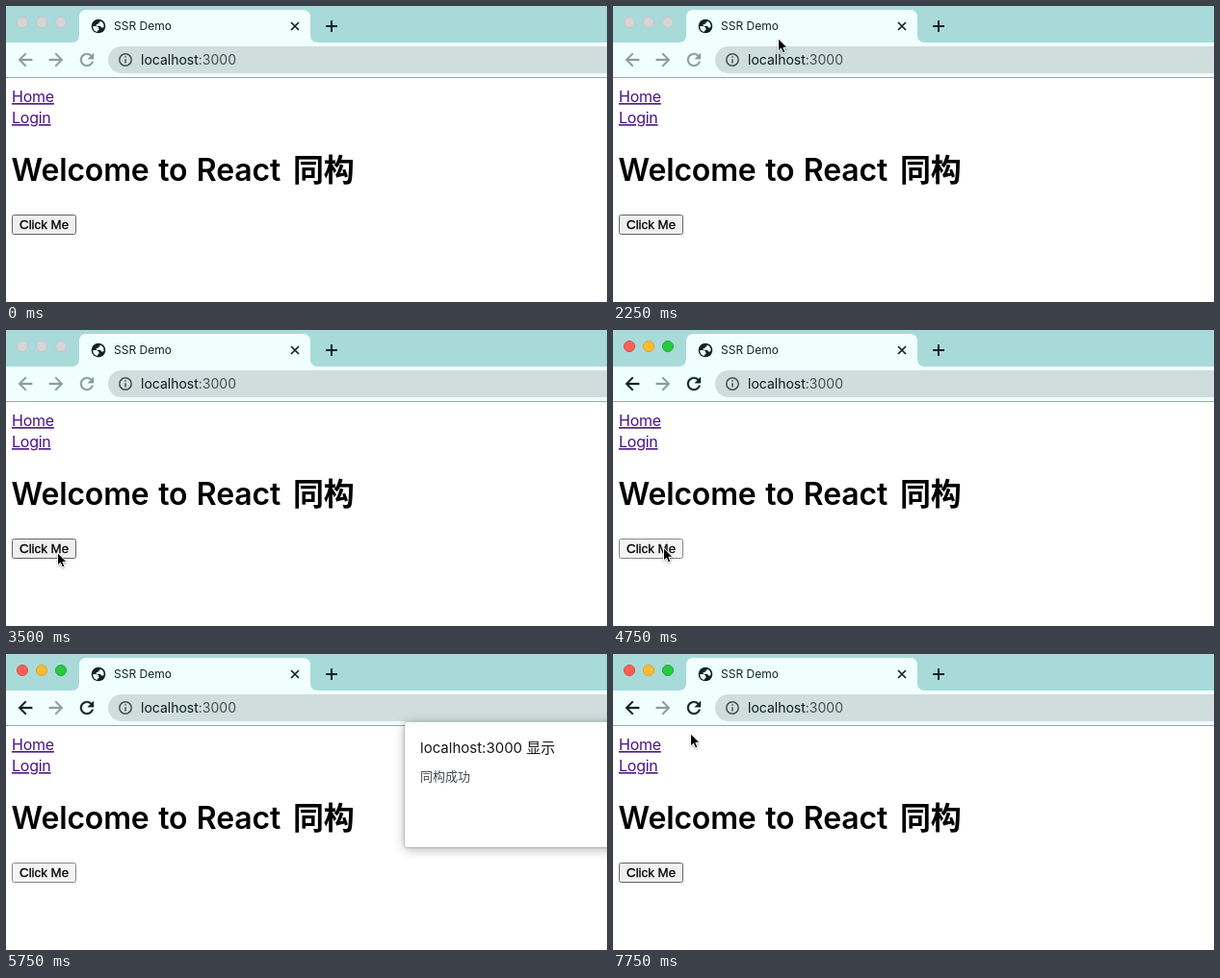
Recreate the animation shown at these times as an HTML page. Size 624 by 308 pixels, loop 8 s.

```html
<!DOCTYPE html>
<html lang="zh-CN">
<head>
<meta charset="utf-8">
<title>SSR Demo</title>
<style>
  html, body { margin: 0; height: 100%; overflow: hidden; background: #fff; }
  svg { display: block; width: 624px; height: 308px; font-family: Inter, "Noto Sans CJK SC", "Noto Sans CJK", sans-serif; }
  .ink { fill: #0c2326; stroke: #0c2326; }
  .dim { fill: #8b9c9d; stroke: #8b9c9d; }
  .nav { stroke-width: .4; }
  .line { fill: none; stroke: #0c2326; }
  .link { font-size: 16px; letter-spacing: -.25px; fill: #4a1486; text-decoration: underline; }
  .heading { font-size: 32px; font-weight: 600; letter-spacing: -.15px; word-spacing: 1.6px; }
  #dialog rect { filter: drop-shadow(0 0 1px rgba(0,0,0,.4)) drop-shadow(0 2px 6px rgba(0,0,0,.3)); }
  #cursor { filter: drop-shadow(0 1px 1px rgba(0,0,0,.3)); }
</style>
</head>
<body>
<svg viewBox="0 0 624 308">
  <!-- tab strip -->
  <rect width="624" height="39" fill="#a8dada"/>
  <g id="lights" stroke-width="1">
    <circle cx="17" cy="17" r="5.5"/>
    <circle cx="37" cy="17" r="5.5"/>
    <circle cx="57" cy="17" r="5.5"/>
  </g>
  <path fill="#f0fffe" d="M68 38q8 0 8-8V12q0-8 8-8H308q8 0 8 8V30q0 8 8 8H624V74H0V38z"/>
  <circle cx="96" cy="21" r="7.3" fill="#0c2326"/>
  <path fill="#f0fffe" d="M90.3 21h2.6q3.6 0 3.6 3v1q-2 .2-1.6 2.1a6 6 0 0 1-4.6-6.1zM97.5 15.4v2h-1.8v1.7h-2v1.6h3.4q1.8 0 1.8 1.8h1.4q1 0 1.3-1a6 6 0 0 0-4.1-6.1z"/>
  <text x="112" y="25" font-size="12" fill="#0c2326">SSR Demo</text>
  <path class="line" stroke-width="1.7" d="M296 17l8 8m0-8l-8 8"/>
  <path class="line" stroke-width="2" d="M332 21h12m-6-6v12"/>

  <!-- toolbar -->
  <path d="M0 74.5H624" stroke="#9ba9a9"/>
  <defs><path id="arrow" d="M8 -1H-4.17L1.42 -6.59 0 -8-8 0 0 8 1.41 6.59-4.17 1H8z"/></defs>
  <g class="nav">
    <g id="nav">
      <use href="#arrow" transform="translate(20 56) scale(.9)"/>
      <path transform="translate(73.5 45.5) scale(.875)" d="M17.65 6.35C16.2 4.9 14.21 4 12 4c-4.42 0-7.99 3.58-7.99 8s3.57 8 7.99 8c3.73 0 6.84-2.55 7.73-6h-2.08c-.82 2.33-3.04 4-5.65 4-3.31 0-6-2.69-6-6s2.69-6 6-6c1.66 0 3.14.69 4.22 1.78L13 11h7V4l-2.35 2.35z"/>
    </g>
    <use href="#arrow" class="dim" transform="translate(52 56) scale(-.9 .9)"/>
  </g>
  <rect x="106" y="42" width="540" height="28" rx="14" fill="#cfdddc"/>
  <g fill="none" stroke="#445152" stroke-width="1.5">
    <circle cx="124" cy="56" r="6.2"/>
    <path d="M124 52.2v1.5m0 1.5v4.3"/>
  </g>
  <text x="140" y="61" font-size="14" fill="#0a1a1c">localhost<tspan fill="#435152">:3000</tspan></text>

  <!-- page -->
  <text class="link" x="6" y="100">Home</text>
  <text class="link" x="6" y="122">Login</text>
  <text class="heading" x="5.5" y="182">Welcome to React</text>
  <text class="heading" x="298" y="182">同构</text>
  <rect id="button" x="6.5" y="217.5" width="66" height="20" rx="2"/>
  <text x="14" y="232" font-size="13.333" font-family="Liberation Sans, Arial, sans-serif" stroke="#000" stroke-width=".3">Click Me</text>

  <g id="dialog">
    <rect x="414" y="71" width="260" height="130" rx="3" fill="#fff"/>
    <text x="430" y="103" font-size="15" fill="#17181a">localhost:3000 显示</text>
    <text x="430" y="132" font-size="13" fill="#45484c">同构成功</text>
  </g>
  <path id="cursor" stroke="#fff" stroke-width="1" d="M-.5 .8V14l3-2.8 2 4.7 2.4-1-2-4.6H9z"/>
</svg>
<script>
  const LOOP = 8000;
  const $ = id => document.getElementById(id);
  const lights = [...$('lights').children];

  // [start ms, x, y]; no position means the pointer is hidden
  const pointer = [
    [0], [750, 176, 241], [1000, 171, 229], [1250, 117, 226], [1500, 81, 226],
    [1750, 62, 231], [2000, 146, 61], [2250, 172, 33], [2500, 172, 57],
    [2750, 123, 145], [3000, 75, 217], [3250, 59, 223], [3500, 54, 231],
    [3750, 53, 226], [5500, 411, 186], [5750], [7250, 352, 152],
    [7500, 134, 104], [7750, 81, 82]
  ];
  const buttonLook = {
    normal: ['#efefef', '#636363'],
    pressed: ['#f5f5f5', '#858585'],
    hover: ['#e2e2e2', '#454545']
  };
  const lightFills = ['#ff5f57', '#febc2e', '#28c840'];
  const lightEdges = ['#e2463f', '#dfa023', '#1dad2b'];

  const show = (el, on) => el.setAttribute('visibility', on ? 'visible' : 'hidden');
  const paint = (el, fill, stroke) => {
    el.setAttribute('fill', fill);
    el.setAttribute('stroke', stroke);
  };

  function render(t) {
    const [, x, y] = pointer.findLast(([start]) => start <= t);
    show($('cursor'), x !== undefined);
    if (x !== undefined) $('cursor').setAttribute('transform', `translate(${x} ${y})`);

    const active = t >= 3750;
    lights.forEach((light, i) =>
      paint(light, active ? lightFills[i] : '#d6d4d6', active ? lightEdges[i] : '#c4c8c9'));
    $('nav').setAttribute('class', t >= 4000 ? 'ink' : 'dim');

    const state = t >= 4750 && t < 7000 ? 'pressed' : t >= 7000 && t < 7250 ? 'hover' : 'normal';
    paint($('button'), ...buttonLook[state]);
    show($('dialog'), t >= 5000 && t < 7000);
  }

  const begin = performance.now();
  function tick() {
    render((performance.now() - begin) % LOOP);
    requestAnimationFrame(tick);
  }
  tick();
</script>
</body>
</html>
```
